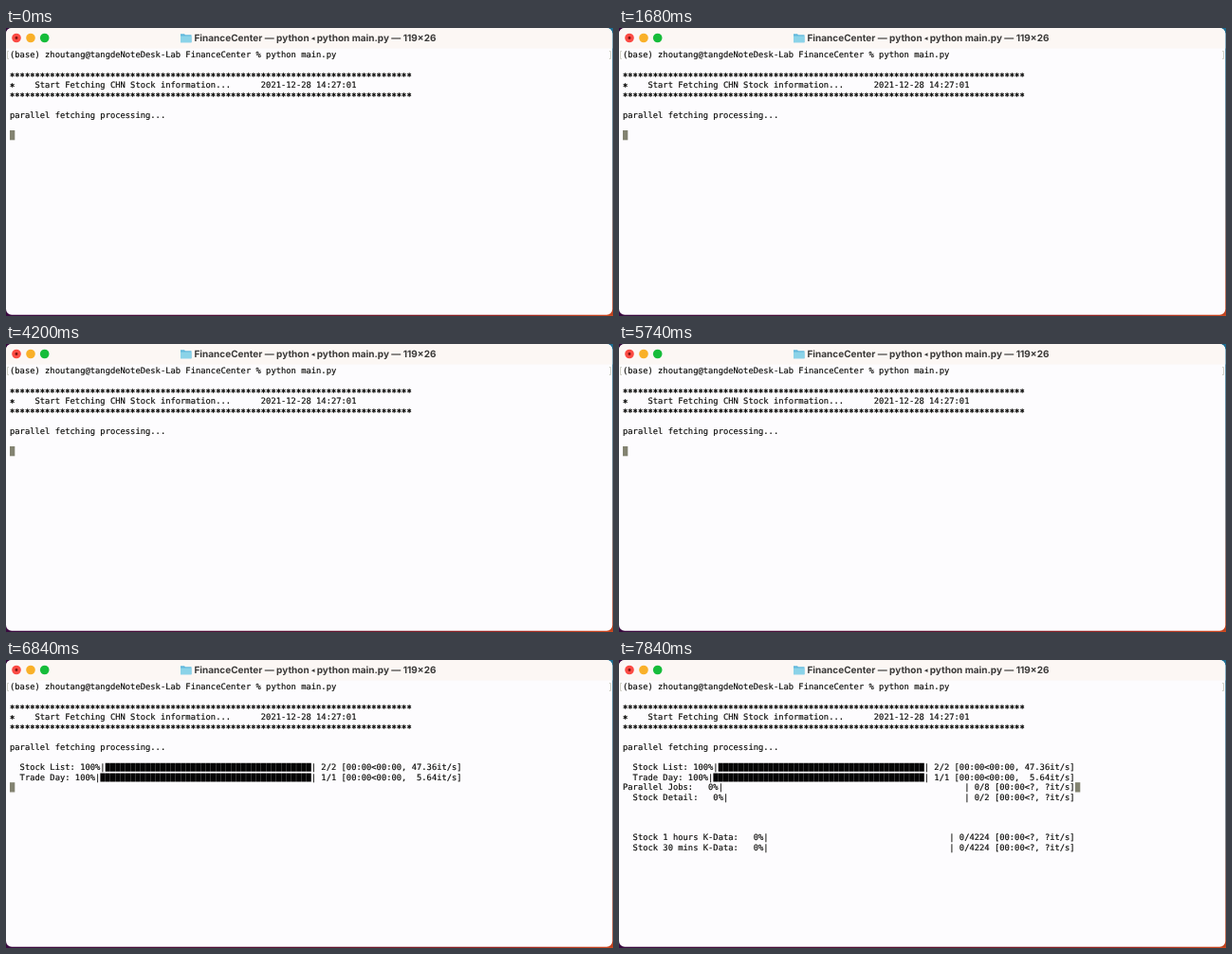
An HTML page for the animation above (8000 ms loop, 640 by 304 pixels).

```html
<!DOCTYPE html>
<html lang="en">
<head>
<meta charset="utf-8">
<title>Terminal</title>
<style>
  html, body { margin: 0; width: 100%; height: 100%; overflow: hidden; background: #fdfcfe; }
  svg { display: block; width: 640px; height: 304px; }
  text { white-space: pre; text-rendering: geometricPrecision; }
  .row { font: 8.81px "DejaVu Sans Mono", monospace; fill: #080806; stroke: #080806; stroke-width: .15px; }
  .star { stroke-width: .4px; }
  .title { font: 700 10px Inter, sans-serif; fill: #3b3a39; }
  .cursor { fill: #838371; animation: cursor 8s step-end infinite; }
  .stock, .trade-start, .trade-done, .jobs, .hours, .mins { visibility: hidden; animation: 8s step-end infinite; }
  .stock { animation-name: stock; }
  .trade-start { animation-name: trade-start; }
  .trade-done { animation-name: trade-done; }
  .jobs { animation-name: jobs; }
  .hours { animation-name: hours; }
  .mins { animation-name: mins; }
  @keyframes stock { 74.5%, 100% { visibility: visible; } }
  @keyframes trade-start { 74.5% { visibility: visible; } 76.75%, 100% { visibility: hidden; } }
  @keyframes trade-done { 76.75%, 100% { visibility: visible; } }
  @keyframes jobs { 87.75%, 100% { visibility: visible; } }
  @keyframes hours { 92.25%, 100% { visibility: visible; } }
  @keyframes mins { 94.25%, 100% { visibility: visible; } }
  @keyframes cursor {
    0% { transform: translate(4px, 108px); }
    74.5% { transform: translate(481px, 118.6px); }
    76.75% { transform: translate(4px, 129.2px); }
    87.75%, 100% { transform: translate(481px, 129.2px); }
  }
</style>
</head>
<body>
<svg viewBox="0 0 640 304">
  <defs>
    <linearGradient id="desk">
      <stop offset="0" stop-color="#3a0a40"/>
      <stop offset=".5" stop-color="#5a1030"/>
      <stop offset=".85" stop-color="#a02820"/>
      <stop offset="1" stop-color="#d04a20"/>
    </linearGradient>
    <linearGradient id="side" x2="0" y2="1">
      <stop offset="0" stop-color="#1d6c90"/>
      <stop offset=".6" stop-color="#5a6068"/>
      <stop offset="1" stop-color="#c04420"/>
    </linearGradient>
    <clipPath id="window"><rect width="639.3" height="302.8" rx="6"/></clipPath>
  </defs>
  <rect width="640" height="304" fill="url(#desk)"/>
  <rect x="634" width="6" height="303" fill="url(#side)"/>
  <g clip-path="url(#window)">
    <rect width="640" height="304" fill="#fdfcfe"/>
    <rect width="640" height="21.5" fill="#fcf7f4"/>
  </g>
  <circle cx="11" cy="10.5" r="4.8" fill="#fb4a43"/>
  <circle cx="11" cy="10.5" r="1.4" fill="#7c1410"/>
  <circle cx="26" cy="10.5" r="4.8" fill="#f9b028"/>
  <circle cx="40.7" cy="10.5" r="4.8" fill="#16bc3a"/>
  <path d="M184 6.2h4l1 1h6.500v8h-11.500z" fill="#62b9dc"/>
  <path d="M184 8.500h11.500v6.700h-11.500z" fill="#8bd3e8"/>
  <text class="title" x="198.500" y="13.800">FinanceCenter — python <tspan font-size="6.500" dy="-.8">◂</tspan><tspan dy=".8"> python main.py — 119×26</tspan></text>
  <path d="M3 24.500h-1.500v8h1.500M636 24.500h1.500v8h-1.500" fill="none" stroke="#c4c4b8" stroke-width=".8"/>
  <g id="screen"></g>
  <rect class="cursor" width="5.3" height="10.3"/>
</svg>
<script>
  const CELL = 5.3, LINE = 10.6, LEFT = 4, COLUMNS = 90;
  const screen = document.getElementById("screen");

  function add(tag, attributes, content = "") {
    const node = document.createElementNS("http://www.w3.org/2000/svg", tag);
    for (const key in attributes) node.setAttribute(key, attributes[key]);
    node.textContent = content;
    screen.append(node);
  }

  function write(row, content, name = "", shift = 0) {
    add("text", { class: `row ${name}`, x: LEFT, y: 31.3 + row * LINE + shift }, content);
  }

  function stars(row, count) {
    write(row, "*".repeat(count), "star", 1.6);
  }

  function progress(row, label, tail, name, full = false) {
    const head = `${label}: ${full ? "100" : "  0"}%|`;
    const end = `| ${tail}]`;
    const width = COLUMNS - head.length - end.length;
    write(row, head + " ".repeat(width) + end, name);
    if (!full) return;
    const x = LEFT + head.length * CELL;
    const y = 24 + row * LINE;
    let cells = "";
    for (let i = 0; i < width; i++) cells += `M${x + i * CELL} ${y}h5.1v9h-5.1z`;
    add("path", { class: name, d: cells, fill: "#050505" });
  }

  write(0, "(base) zhoutang@tangdeNoteDesk-Lab FinanceCenter % python main.py");
  stars(2, 80);
  stars(3, 1);
  write(3, "     Start Fetching CHN Stock information...      2021-12-28 14:27:01");
  stars(4, 80);
  write(6, "parallel fetching processing...");

  const idle = "[00:00<?, ?it/s";
  progress(8, "  Stock List", "2/2 [00:00<00:00, 47.36it/s", "stock", true);
  progress(9, "  Trade Day", `0/1 ${idle}`, "trade-start");
  progress(9, "  Trade Day", "1/1 [00:00<00:00,  5.64it/s", "trade-done", true);
  progress(10, "Parallel Jobs", `0/8 ${idle}`, "jobs");
  progress(11, "  Stock Detail", `0/2 ${idle}`, "jobs");
  progress(15, "  Stock 1 hours K-Data", `0/4224 ${idle}`, "hours");
  progress(16, "  Stock 30 mins K-Data", `0/4224 ${idle}`, "mins");
</script>
</body>
</html>
```
